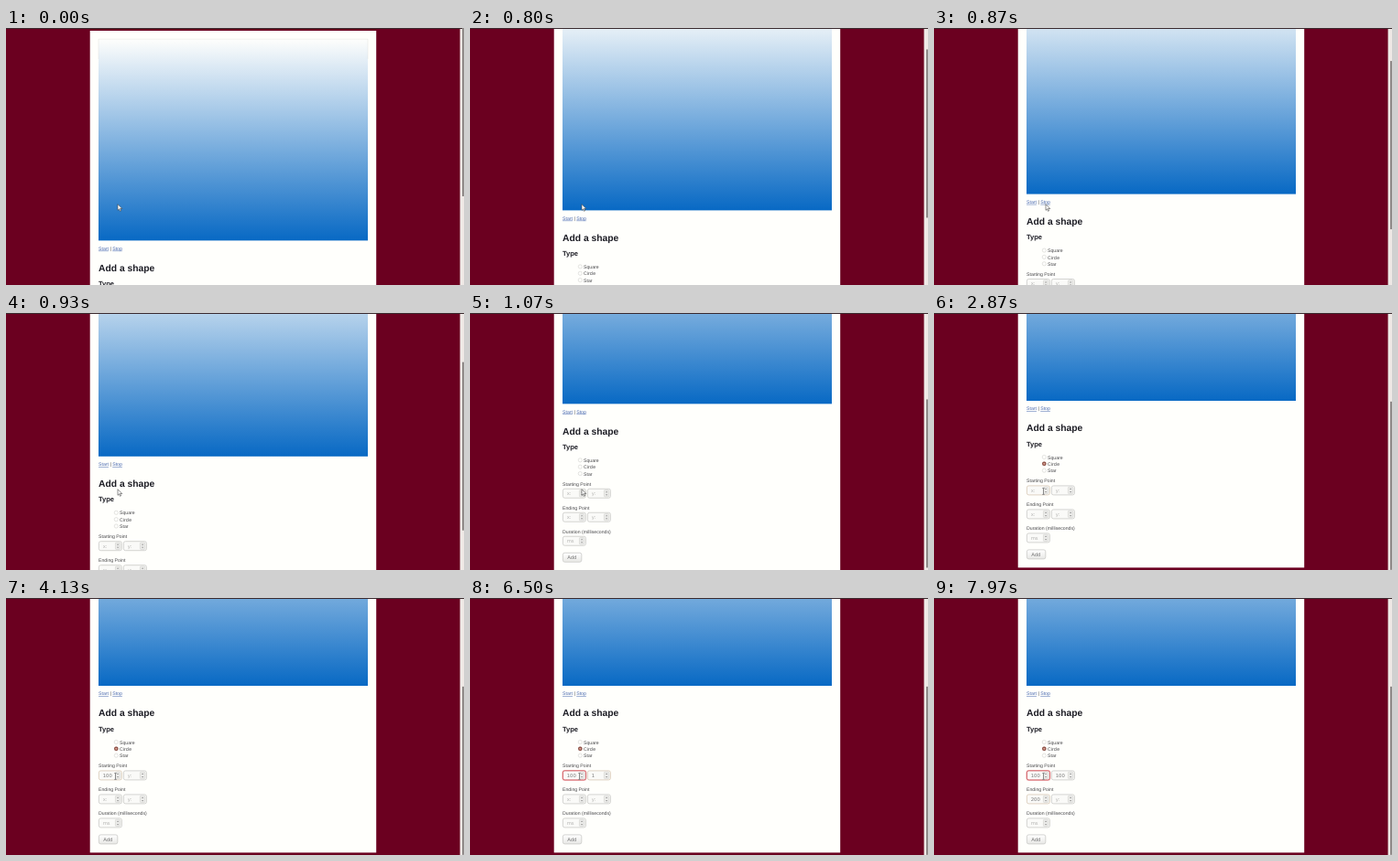
An HTML page that plays this animation: 500 px wide and 281 px high, repeating every 8 s.

```html
<!DOCTYPE html>
<html lang="en">
<head>
<meta charset="utf-8">
<title>Add a shape</title>
<style>
  html, body { margin: 0; height: 100%; overflow: hidden; background: #6b0020; }
  svg { display: block; width: 500px; height: 281px; }
  text { font: 5.2px "Liberation Sans", Arial, sans-serif; fill: #48484c; text-rendering: geometricPrecision; }
  .h1 { font-size: 10.3px; font-weight: bold; fill: #1c1c24; }
  .h2 { font-size: 7.5px; font-weight: bold; fill: #1c1c24; }
  .link { fill: #4a6ab0; text-decoration: underline; text-decoration-thickness: .4px; }
  .value { font: 5.3px "DejaVu Sans", sans-serif; fill: #777; }
  .hint { fill: #b4b4b2; }
  .box { fill: #fafaf8; stroke: #cacac7; stroke-width: .8; }
  .focus .box { stroke: #d8c8b4; }
  .bad .box { stroke: #c8404a; }
  .glow { fill: none; stroke: #e0505a; stroke-width: 2; opacity: 0; }
  .bad .glow { opacity: .35; }
  .spin { fill: #ececea; stroke: #cacac7; stroke-width: .5; }
  .tick { fill: #9a9a98; }
</style>
</head>
<body>
<svg viewBox="0 0 500 281">
  <defs>
    <linearGradient id="sky" x2="0" y2="1">
      <stop stop-color="#fefefc"/><stop offset="1" stop-color="#0869c4"/>
    </linearGradient>
    <linearGradient id="button" x2="0" y2="1">
      <stop stop-color="#fff"/><stop offset="1" stop-color="#e8e8e5"/>
    </linearGradient>
  </defs>
  <rect width="500" height="281" fill="#6b0020"/>
  <g id="page">
    <rect x="91.7" y="3" width="312.5" height="411.8" fill="#fffffc"/>
    <rect x="101" y="12" width="294" height="220.4" fill="url(#sky)"/>
    <path d="M101 34V12.2H395V34" fill="none" stroke="#dcdcd8" stroke-width=".4"/>
    <text x="101" y="242.6"><tspan class="link">Start</tspan> | <tspan class="link">Stop</tspan></text>
    <text class="h1" x="101" y="265.7">Add a shape</text>
    <text class="h2" x="101" y="282">Type</text>
    <g id="form"></g>
    <rect x="101.4" y="395.3" width="20.4" height="10" rx="2" fill="url(#button)" stroke="#cacac7" stroke-width=".8"/>
    <text class="value" x="106.2" y="402.3">Add</text>
  </g>
  <rect width="500" height="1" fill="#3a2a2e"/>
  <rect x="495.6" y="1" width="4.4" height="280" fill="#efe9e6"/>
  <rect id="thumb" x="498" width="2" height="184" fill="#8f8a88"/>
  <path id="arrow" d="M0 0V6.6L1.5 5.2L2.5 7.6L3.6 7.1L2.6 4.8H4.8Z" fill="#fff" stroke="#444" stroke-width=".6"/>
  <path id="beam" d="M-1.2-3.4H1.2M0-3.4V3.4M-1.2 3.4H1.2" fill="none" stroke="#888" stroke-width="1"/>
</svg>
<script>
const LOOP = 8000;
const $ = id => document.getElementById(id);
const form = $('form');

const radio = (label, i) => {
  const y = 293.9 + i * 7.35;
  return `<circle cx="120.3" cy="${y}" r="2.1" fill="#fdfdfb" stroke="#cacac6" stroke-width=".5"/>
    <text x="124" y="${y + 2.1}">${label}</text>`;
};

const field = (id, x, y, hint) => `<g id="${id}" data-hint="${hint}">
  <rect class="glow" x="${x}" y="${y}" width="25" height="10" rx="2"/>
  <rect class="box" x="${x}" y="${y}" width="25" height="10" rx="2"/>
  <rect class="spin" x="${x + 18}" y="${y + 1.3}" width="5.4" height="7.4" rx="1"/>
  <path class="tick" d="M${x + 19.5} ${y + 4}l1.2-1.5 1.2 1.5zM${x + 19.5} ${y + 6}l1.2 1.5 1.2-1.5z"/>
  <text class="value" x="${x + 4.3}" y="${y + 6.8}"></text></g>`;

const label = (text, y) => `<text x="101" y="${y}">${text}</text>`;

form.innerHTML = ['Square', 'Circle', 'Star'].map(radio).join('') +
  '<circle id="dot" cx="120.3" cy="301.25" r="1.7" fill="#d8a294" stroke="#8a4a40" stroke-width="1.1"/>' +
  label('Starting Point', 321.7) + field('x1', 101.4, 325.3, 'x:') + field('y1', 128.4, 325.3, 'y:') +
  label('Ending Point', 347.7) + field('x2', 101.4, 351.3, 'x:') + field('y2', 128.4, 351.3, 'y:') +
  label('Duration (milliseconds)', 373.7) + field('ms', 101.4, 377.3, 'ms');

// Focus span, typed text and the time of each key press
const typing = {
  x1: { focus: [2730, 4800], text: '100', keys: [3430, 3870, 4030] },
  y1: { focus: [4800, 7100], text: '100', keys: [6500, 6770, 6900] },
  x2: { focus: [7100, LOOP], text: '200', keys: [7630, 7770, 7950] }
};

// Linear interpolation through [time, value] points
function track(points, t) {
  const i = points.findIndex(p => p[0] > t);
  if (i < 0) return points[points.length - 1][1];
  if (i === 0) return points[0][1];
  const [t0, a] = points[i - 1], [t1, b] = points[i];
  return a + (b - a) * (t - t0) / (t1 - t0);
}

const scroll = [[670, 0], [870, 50.4], [1070, 133], [1130, 136.4]];
const pointerX = [[1300, 122], [1930, 120], [2230, 120], [2730, 119.5]];
const pointerY = [[1300, 192.7], [1930, 165], [2230, 165], [2730, 194]];

function showField(group, t) {
  const { focus, text, keys } = typing[group.id] || { focus: [LOOP, LOOP], text: '', keys: [] };
  const typed = text.slice(0, keys.filter(k => t >= k).length);
  const value = group.querySelector('text');
  value.textContent = typed || group.dataset.hint;
  value.classList.toggle('hint', !typed);
  group.classList.toggle('focus', t >= focus[0] && t < focus[1]);
  group.classList.toggle('bad', group.id === 'x1' && t >= focus[1]);
}

function move(id, x, y) {
  $(id).setAttribute('transform', `translate(${x} ${y})`);
}

function draw() {
  const t = performance.now() % LOOP;
  const top = track(scroll, t);
  const overField = t >= 2870;
  move('page', 0, -top);
  move('thumb', 0, top * .71);
  move('arrow', track(pointerX, t), track(pointerY, t));
  move('beam', 119.5, 195);
  $('arrow').style.display = overField ? 'none' : '';
  $('beam').style.display = overField ? '' : 'none';
  $('dot').style.display = t >= 2070 ? '' : 'none';
  form.querySelectorAll('g').forEach(group => showField(group, t));
  requestAnimationFrame(draw);
}
draw();
</script>
</body>
</html>
```
